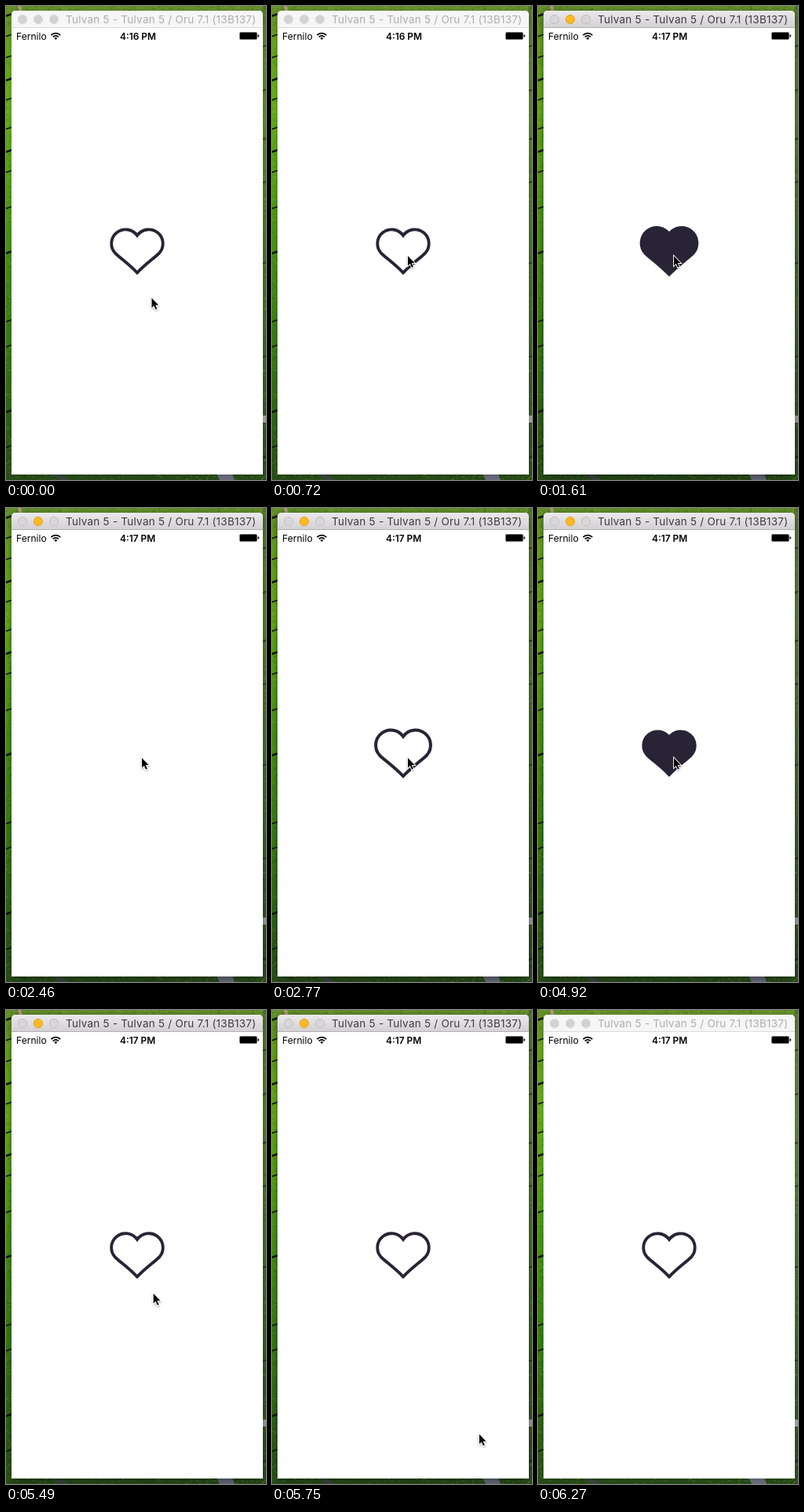
Recreate the animation shown at these times as an HTML page. Size 331x603 px, loop 6350 ms.

```html
<!DOCTYPE html>
<html lang="en">
<head>
<meta charset="utf-8">
<title>Heart toggle</title>
<style>
html, body { margin: 0; width: 100%; height: 100%; overflow: hidden; background: #fff; }
svg { display: block; width: 331px; height: 603px; font-family: Inter, Roboto, sans-serif; }
</style>
</head>
<body>
<svg viewBox="0 0 331 603" xmlns="http://www.w3.org/2000/svg">
  <defs>
    <linearGradient id="field" x1="0" y1="0" x2="0" y2="1">
      <stop offset="0" stop-color="#648f2c"/>
      <stop offset=".08" stop-color="#6aa623"/>
      <stop offset=".22" stop-color="#69b11f"/>
      <stop offset=".45" stop-color="#4f9a19"/>
      <stop offset=".7" stop-color="#3a8014"/>
      <stop offset="1" stop-color="#2a4f1a"/>
    </linearGradient>
    <linearGradient id="bar" x1="0" y1="0" x2="0" y2="1">
      <stop offset="0" stop-color="#ebe9eb"/>
      <stop offset="1" stop-color="#d2d0d2"/>
    </linearGradient>
    <filter id="blur" x="-10%" y="-10%" width="120%" height="120%">
      <feGaussianBlur stdDeviation="6"/>
    </filter>
    <filter id="soft" x="-50%" y="-50%" width="200%" height="200%">
      <feDropShadow dx="0" dy="1" stdDeviation=".8" flood-opacity=".4"/>
    </filter>
  </defs>

  <rect width="331" height="603" fill="url(#field)"/>
  <path d="M326 0h5v603h-5z" fill="#2c4a1c" opacity=".3"/>
  <g id="land" fill="none"></g>
  <path d="M15 0h4l2 7h-4z" fill="#b79a86"/>
  <path d="M326 521h5v9h-5z" fill="#a9aca2"/>
  <path d="M268 595h20l3 8h-19z" fill="#6f7383"/>
  <path d="M57 595h10l14 8H69z" fill="#3f4a45"/>
  <rect id="shade" x="7" y="9" width="320" height="590" rx="5" filter="url(#blur)"/>

  <path d="M7 596V11a5 5 0 0 1 5-5h310a5 5 0 0 1 5 5v585z" fill="#fff"/>
  <path id="titleBar" d="M7 28V11a5 5 0 0 1 5-5h310a5 5 0 0 1 5 5v17z"/>
  <path id="barEdge" d="M7 27.5h320"/>
  <g id="lights">
    <circle cx="21" cy="17" r="5.6"/>
    <circle cx="41" cy="17" r="5.6"/>
    <circle cx="61" cy="17" r="5.6"/>
  </g>
  <text id="title" x="76" y="22" font-size="13.5" letter-spacing=".24">Tulvan 5 - Tulvan 5 / Oru 7.1 (13B137)</text>

  <text x="13" y="42.5" font-size="12.1">Fernilo</text>
  <g fill="none" stroke="#000" stroke-width="1.8">
    <path d="M57.4 37.2a8.2 8.2 0 0 1 11.8 0"/>
    <path d="M59.7 39.5a5 5 0 0 1 7.2 0"/>
  </g>
  <path d="M61.3 40.9a2.9 2.9 0 0 1 4 0l-2 2z"/>
  <text id="clock" x="145" y="42.5" font-size="11.9" font-weight="600"></text>
  <rect x="297.5" y="33.5" width="22" height="9" rx="1.4" fill="none" stroke="#000" stroke-opacity=".55"/>
  <rect x="298" y="34" width="21" height="8" rx=".6"/>
  <path d="M320.5 36.2a1.8 1.8 0 0 1 0 3.6z"/>

  <path id="heart" stroke="#282435" stroke-width="3.8" stroke-miterlimit="8"
    d="M0-20A18 18 0 1 0-28 2.5C-20 10-12 15 0 27.3C12 15 20 10 28 2.5A18 18 0 1 0 0-20z"/>
  <path id="pointer" filter="url(#soft)" stroke="#fff" stroke-width="1.8" paint-order="stroke"
    d="M1 1v12.4l2.8-2.7 2.2 4.9 1.9-.8-2.2-4.8h4z"/>
</svg>
<script>
const LOOP = 6350;
const FOCUS = 1260, BLUR = 6270;
const TOGGLES = [1330, 2460, 3910, 5300];
const $ = id => document.getElementById(id);
const set = (el, attrs) => {
  for (const k in attrs) el.setAttribute(k, attrs[k]);
};
const clamp = v => Math.min(1, Math.max(0, v));
const ease = (t, a, b) => {
  const u = clamp((t - a) / (b - a));
  return u * u * (3 - 2 * u);
};
const mix = (a, b, u) => a + (b - a) * u;

// grass blades and dark ridges around the window
function drawLand() {
  let seed = 7;
  const rand = () => (seed = seed * 16807 % 2147483647) / 2147483647;
  const line = (d, width, stroke, opacity = 1) => {
    const p = document.createElementNS("http://www.w3.org/2000/svg", "path");
    set(p, { d, stroke, "stroke-width": width, opacity });
    $("land").append(p);
  };
  const blade = (x, y) =>
    line(`M${x} ${y}l${1 + 2 * rand()} -1`, 1, rand() < 0.5 ? "#173a0a" : "#a4cf52", 0.3);
  for (let i = 0; i < 260; i++) {
    blade(7 * rand(), 603 * rand());
    if (i % 2) blade(327 + 3 * rand(), 603 * rand());
    blade(331 * rand(), i % 2 ? 6 * rand() : 596 + 7 * rand());
  }
  const ridges = [12, 38, 65, 94, 119, 156, 185, 211, 257, 314, 401, 433, 516, 561];
  ridges.forEach((y, i) => {
    line(`M-1 ${y + 1}l9-3`, i % 3 ? 1.8 : 2.6, "#0d1a08");
    if (i % 2) line(`M326 ${y + 14}l6-2`, 1.4, "#0d1a08", 0.7);
  });
}

// underdamped spring from 0 to 1
function spring(ms) {
  if (ms > 600) return 1;
  const s = ms / 1000, w = 11.83 * s;
  return 1 - Math.exp(-9.5 * s) * (Math.cos(w) + 0.803 * Math.sin(w));
}

function pointerAt(t) {
  if (t < 5300) {
    const u = ease(t, 140, 730);
    return [mix(184.5, 172, u), mix(370.5, 317, u)];
  }
  if (t >= 5990) return [296, 606];
  const u = ease(t, 5350, 5925);
  return [mix(172, 295, u) - 30 * u * (1 - u), mix(317, 601, u)];
}

function draw(t) {
  const active = t >= FOCUS && t < BLUR;
  set($("shade"), { opacity: active ? 0.5 : 0.22 });
  set($("titleBar"), { fill: active ? "url(#bar)" : "#f6f6f6" });
  set($("barEdge"), { stroke: active ? "#b4b2b4" : "#dadada" });
  [...$("lights").children].forEach((c, i) => {
    const lit = active && i === 1;
    set(c, {
      fill: lit ? "#fdb924" : active ? "#d8d6d8" : "#d2d2d2",
      stroke: lit ? "#dfa023" : active ? "#bfbdbf" : "#d8d8d8",
      "stroke-width": 0.9
    });
  });
  set($("title"), { fill: active ? "#3e3c3e" : "#adadad" });
  $("clock").textContent = t < FOCUS ? "4:16 PM" : "4:17 PM";

  const taps = TOGGLES.filter(at => at <= t);
  const scale = taps.length ? spring(t - taps[taps.length - 1]) : 1;
  set($("heart"), {
    transform: `translate(167 312) scale(${scale.toFixed(4)})`,
    fill: taps.length % 2 ? "#282435" : "none",
    visibility: scale < 0.002 ? "hidden" : "visible"
  });
  const [x, y] = pointerAt(t);
  set($("pointer"), { transform: `translate(${x.toFixed(2)} ${y.toFixed(2)})` });
}

drawLand();
const start = performance.now();
function tick() {
  draw((performance.now() - start) % LOOP);
  requestAnimationFrame(tick);
}
tick();
</script>
</body>
</html>
```
